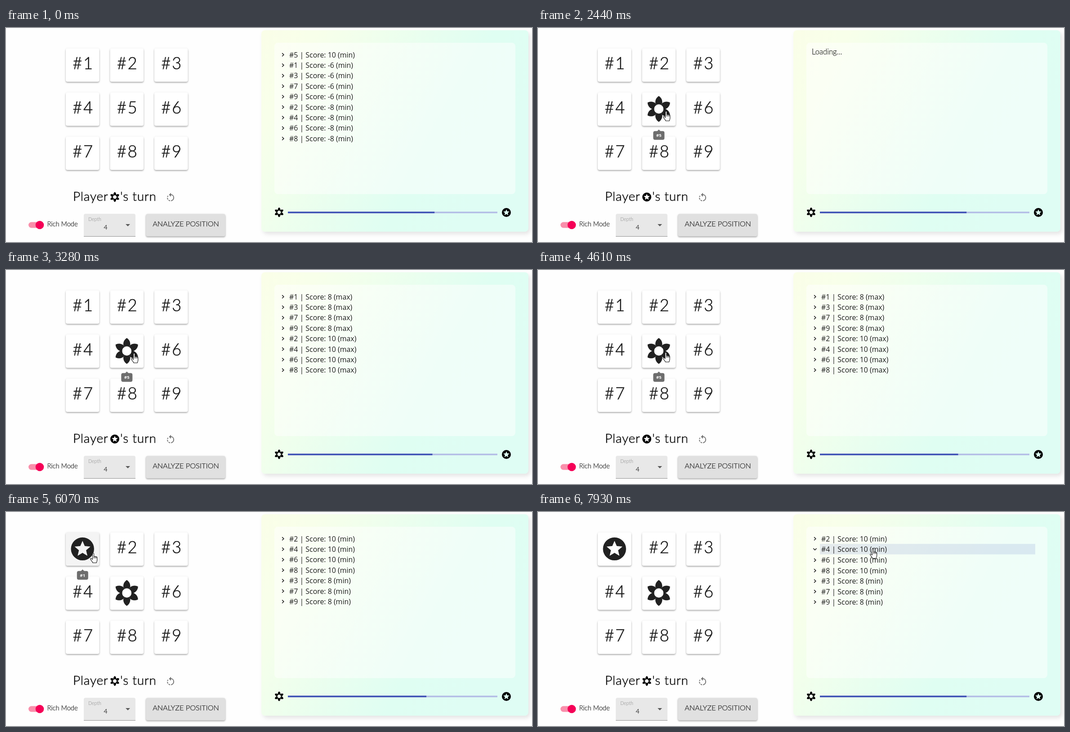
These frames come from a looping animation (1170x478 px, 8000 ms). An HTML page:

```html
<!DOCTYPE html>
<html lang="en">
<head>
<meta charset="utf-8">
<title>Position analysis</title>
<style>
  html, body { margin: 0; width: 100%; height: 100%; overflow: hidden; background: #fefefe; }
  svg { display: block; width: 1170px; height: 478px; }
  text { font-family: Lato, "Open Sans", sans-serif; font-weight: 300; fill: #1c1c1c; stroke: #1c1c1c; stroke-width: .25px; }
  .label { font-size: 36.5px; letter-spacing: 2.5px; text-anchor: middle; stroke-width: .6px; }
  .turn { font-size: 28px; letter-spacing: .8px; fill: #000; stroke: #000; stroke-width: .5px; }
  .soft { fill: #858585; stroke: none; }
  .row text { font: 15.9px "Open Sans", "Noto Sans", sans-serif; stroke: none; }
  .tip text { font: bold 9.5px "Open Sans", sans-serif; fill: #fff; stroke: none; text-anchor: middle; }
  .raised { filter: drop-shadow(0 2px 1.5px rgba(0,0,0,.26)) drop-shadow(0 1px 2px rgba(0,0,0,.1)); }
  .panel { filter: drop-shadow(4px 5px 5px rgba(0,0,0,.1)); }
</style>
</head>
<body>
<svg viewBox="0 0 1170 478">
  <defs>
    <linearGradient id="mint" x1="0" y1="0" x2="1" y2=".42">
      <stop offset="0" stop-color="#fafee8"/>
      <stop offset=".18" stop-color="#f8ffea"/>
      <stop offset=".75" stop-color="#dffef2"/>
      <stop offset="1" stop-color="#dffdf4"/>
    </linearGradient>
    <path id="petal" d="M-2-3.46-2.92-5.05-3-6C-3-8.22-1.79-10.15 0-11.2 1.79-10.15 3-8.22 3-6L2.92-5.05 2-3.46A4 4 0 0 0-2-3.46Z"/>
    <g id="flower"></g>
    <path id="star" fill-rule="evenodd" d="M-10 0A10 10 0 1 1 10 0 10 10 0 1 1-10 0ZM4.23 6 3.11 1.18 6.84-2.05 1.92-2.47 0-7-1.92-2.46-6.84-2.04-3.11 1.19-4.23 6 0 3.45Z"/>
    <path id="arrow" d="M.5.5V16l3.6-3.4 2.4 5.4 2.4-1-2.4-5.3h4.9Z"/>
    <path id="hand" d="M-1.6 1.6C-1.6-.5 1.5-.5 1.5 1.6V8c0-1.5 2.7-1.4 2.7.2 0-1.3 2.5-1.2 2.5.5 0-1.1 2-1 2 .7V15c0 3-1.2 4-1.5 6.5H-1c0-2-3.9-5-5-8-.7-1.7 1.1-2.7 2.3-1.3L-1.6 14ZM1.5 8v3.5M4.2 8.5v3M6.7 9v2.5"/>
  </defs>

  <g id="board"></g>

  <text class="turn" x="149" y="386">Player</text>
  <use id="player" transform="translate(242 377.5)"/>
  <text class="turn" x="254" y="386">'s turn</text>
  <g transform="translate(354 367)" fill="none" stroke="#757575" stroke-width="2">
    <path d="M13 5.07A7 7 0 0 1 13 18.93"/>
    <path d="M11 18.93A7 7 0 0 1 6.4 7.8" stroke-dasharray="3.7 2"/>
    <path d="M13 1.1V10L8.45 5.55Z" fill="#757575" stroke="none"/>
  </g>

  <rect x="50" y="433.5" width="33" height="13" rx="6.5" fill="#f98fab"/>
  <circle cx="75" cy="440" r="9.3" fill="#f50057"/>
  <text x="91.5" y="443" font-size="14.7">Rich Mode</text>

  <path d="M173 466V419a4 4 0 0 1 4-4H284a4 4 0 0 1 4 4V466Z" fill="#e8e8e8"/>
  <path d="M173 465.5H288" stroke="#8c8c8c"/>
  <text class="soft" x="183" y="431" font-size="10.7">Depth</text>
  <text x="217.5" y="450" font-size="14">4</text>
  <path d="M266 438h10l-5 5Z" fill="#5a5a5a"/>

  <rect class="raised" x="311.3" y="415.3" width="176.4" height="50" rx="4" fill="#e0e0e0"/>
  <text x="400" y="443.3" font-size="16.3" text-anchor="middle">ANALYZE POSITION</text>

  <rect class="panel" x="568" y="5" width="594" height="450" rx="8" fill="url(#mint)"/>
  <rect x="597" y="33" width="536" height="338" rx="8" fill="#fff" opacity=".5"/>
  <text id="loading" x="609" y="58.5" font-size="16.7">Loading...</text>
  <rect id="hover" x="627" width="479" height="23.5"/>
  <g id="list"></g>

  <use href="#flower" transform="translate(607.5 411.7) scale(.97)"/>
  <path d="M627 412H1093" stroke="#b3bce6" stroke-width="3.6"/>
  <path id="bar" stroke="#3f51b5" stroke-width="3.6"/>
  <use href="#star" transform="translate(1113 412)"/>

  <g id="tips"></g>
  <use id="cursor" fill="#fff" stroke="#111" stroke-width="1.1" stroke-linejoin="round"/>
</svg>
<script>
const LOOP = 8000;
const PITCH = 98.5, SIZE = 74.5, LEFT = 133, TOP = 45.4;
const ROW = 23.4;
const $ = id => document.getElementById(id);

function add(parent, tag, attrs = {}, text = '') {
  const node = document.createElementNS('http://www.w3.org/2000/svg', tag);
  for (const name in attrs) node.setAttribute(name, attrs[name]);
  node.textContent = text;
  return parent.appendChild(node);
}
const set = (node, attrs) => { for (const name in attrs) node.setAttribute(name, attrs[name]); };
const show = (node, on) => node.setAttribute('visibility', on ? 'visible' : 'hidden');
const ramp = (t, from, to) => Math.min(1, Math.max(0, (t - from) / (to - from)));
const cellAt = n => ({ x: LEFT + (n - 1) % 3 * PITCH, y: TOP + Math.floor((n - 1) / 3) * PITCH });

// Standard easing curve, cubic-bezier(.4, 0, .2, 1)
function standard(x) {
  let low = 0, high = 1;
  const curve = (s, a, b) => 3 * s * (1 - s) ** 2 * a + 3 * s * s * (1 - s) * b + s ** 3;
  for (let i = 0; i < 18; i++) {
    const mid = (low + high) / 2;
    if (curve(mid, .4, .2) < x) low = mid; else high = mid;
  }
  return curve(low, 0, 1);
}

for (let i = 0; i < 6; i++)
  add($('flower'), 'use', { href: '#petal', transform: `rotate(${i * 60})` });

const labels = {};
for (let n = 1; n <= 9; n++) {
  const { x, y } = cellAt(n);
  add($('board'), 'rect', { class: 'raised', x, y, width: SIZE, height: SIZE, rx: 4, fill: '#fff' });
  labels[n] = add($('board'), 'text', { class: 'label', x: x + 39, y: y + 47 }, '#' + n);
}

function makePlay(play) {
  const { x, y } = cellAt(play.cell);
  const clip = add($('board'), 'clipPath', { id: 'clip' + play.cell });
  add(clip, 'rect', { x, y, width: SIZE, height: SIZE, rx: 4 });
  const layer = add($('board'), 'g', { 'clip-path': `url(#clip${play.cell})` });
  play.ripple = add(layer, 'circle', { cx: play.x, cy: play.y, fill: '#212121' });
  const reach = (p, start) => Math.max(p - start, start + SIZE - p);
  play.radius = Math.hypot(reach(play.x, x), reach(play.y, y));
  play.mark = add($('board'), 'use', {
    href: play.icon, fill: '#212121', transform: `translate(${x + 37.2} ${y + 37}) scale(2.57)`
  });
  play.tip = add($('tips'), 'g', { class: 'tip', transform: `translate(${x + 37.3} ${y + 86.4})` });
  add(play.tip, 'path', { d: 'M-4 .5 0-3.5 4 .5Z', fill: '#6d6d6d' });
  add(play.tip, 'rect', { x: -12.5, y: 0, width: 25, height: 19.5, rx: 4, fill: '#6d6d6d' });
  add(play.tip, 'text', { x: 0, y: 13.2 }, '#' + play.cell);
  return play;
}
const plays = [
  { cell: 5, icon: '#flower', x: 287, y: 187, click: 2440, press: 2485, done: 3180, tipIn: 1735, tipOut: 4990 },
  { cell: 1, icon: '#star', x: 192, y: 92, click: 5610, press: 5580, done: 6060, tipIn: 5230, tipOut: 6610 }
].map(makePlay);

const results = [
  { from: 0, side: 'min', groups: [['5', 10], ['1379', -6], ['2468', -8]] },
  { from: 3180, side: 'max', groups: [['1379', 8], ['2468', 10]] },
  { from: 6060, side: 'min', groups: [['2468', 10], ['379', 8]] }
];
for (const result of results)
  result.lines = result.groups.flatMap(([cells, score]) =>
    [...cells].map(n => `#${n} | Score: ${score} (${result.side})`));

const rows = Array.from({ length: 9 }, () => {
  const group = add($('list'), 'g', { class: 'row' });
  return {
    group,
    chevron: add(group, 'path', { d: 'M-1.8-3.6 1.8 0-1.8 3.6', fill: 'none', stroke: '#1c1c1c', 'stroke-width': 1.6 }),
    text: add(group, 'text', { x: 630, y: 5.8 })
  };
});

// Pointer moves in discrete steps: start, end, steps, target x, target y, easing power
const moves = [
  [427, 1120, 10, 544, 331, 1],
  [1200, 1660, 7, 293, 205, 1.6],
  [1730, 2040, 5, 285, 186, 1.5],
  [4610, 4760, 3, 283, 180, 1],
  [4990, 5380, 6, 194, 92, 1.3],
  [6610, 6840, 4, 499, 112, 1],
  [6920, 7000, 2, 745, 98, 1],
  [7150, 7300, 3, 745, 82, 1]
];
function pointerAt(t) {
  let x = 1082, y = 460;
  for (const [start, end, steps, toX, toY, power] of moves) {
    if (t < start) break;
    const step = Math.min(steps, 1 + Math.floor((t - start) / (end - start) * (steps - 1) + .06));
    const u = 1 - (1 - step / steps) ** power;
    x += (toX - x) * u;
    y += (toY - y) * u;
  }
  return { x, y };
}
function isClickable({ x, y }) {
  const inCell = (p, start) => p >= start && p < start + 3 * PITCH && (p - start) % PITCH <= SIZE;
  return inCell(x, LEFT) && inCell(y, TOP) || x > 627 && x < 1106 && y > 48 && y < 211;
}

function drawPlay(play, t) {
  const played = t >= play.click;
  show(play.mark, played);
  show(labels[play.cell], !played);
  const grow = standard(ramp(t, play.press, play.press + 550));
  const fade = 1 - standard(ramp(t, play.press + 220, play.press + 770));
  set(play.ripple, {
    r: play.radius * grow,
    opacity: played ? (.1 + .1 * grow) * fade : 0
  });
  play.tip.setAttribute('opacity',
    ramp(t, play.tipIn, play.tipIn + 140) * (1 - ramp(t, play.tipOut, play.tipOut + 140)));
}

function drawList(t) {
  const loading = plays.some(p => t >= p.click && t < p.done);
  show($('loading'), loading);
  show($('list'), !loading);
  const { lines } = results.filter(r => t >= r.from).pop();
  const open = ramp(t, 7810, 7930);
  rows.forEach((row, i) => {
    const line = loading ? '' : lines[i] || '';
    row.group.setAttribute('display', line ? 'inline' : 'none');
    if (row.text.textContent !== line) row.text.textContent = line;
    row.group.setAttribute('transform', `translate(0 ${59.7 + i * ROW + (i > 1 ? open : 0)})`);
    row.chevron.setAttribute('transform', `translate(616 0) rotate(${i === 1 ? 90 * open : 0})`);
  });
}

function draw(t) {
  plays.forEach(play => drawPlay(play, t));
  drawList(t);
  const [first, second] = plays;
  $('player').setAttribute('href', t >= first.click && t < second.click ? '#star' : '#flower');

  const share = 70 - 4 * ramp(t, first.done, 3580) + 4 * ramp(t, second.done, 6460);
  $('bar').setAttribute('d', `M627 412H${627 + 4.66 * share}`);

  const pointer = pointerAt(t);
  const clicked = t >= 7850;
  show($('hover'), t >= 7000);
  set($('hover'), {
    y: pointer.y > 94.5 ? 94.8 : 71.2,
    fill: clicked ? '#3f51b5' : '#000',
    opacity: clicked ? .12 : .04
  });
  show($('cursor'), t >= 350);
  set($('cursor'), {
    href: isClickable(pointer) ? '#hand' : '#arrow',
    transform: `translate(${pointer.x} ${pointer.y})`
  });
}

function tick() {
  draw(performance.now() % LOOP);
  requestAnimationFrame(tick);
}
tick();
</script>
</body>
</html>
```
